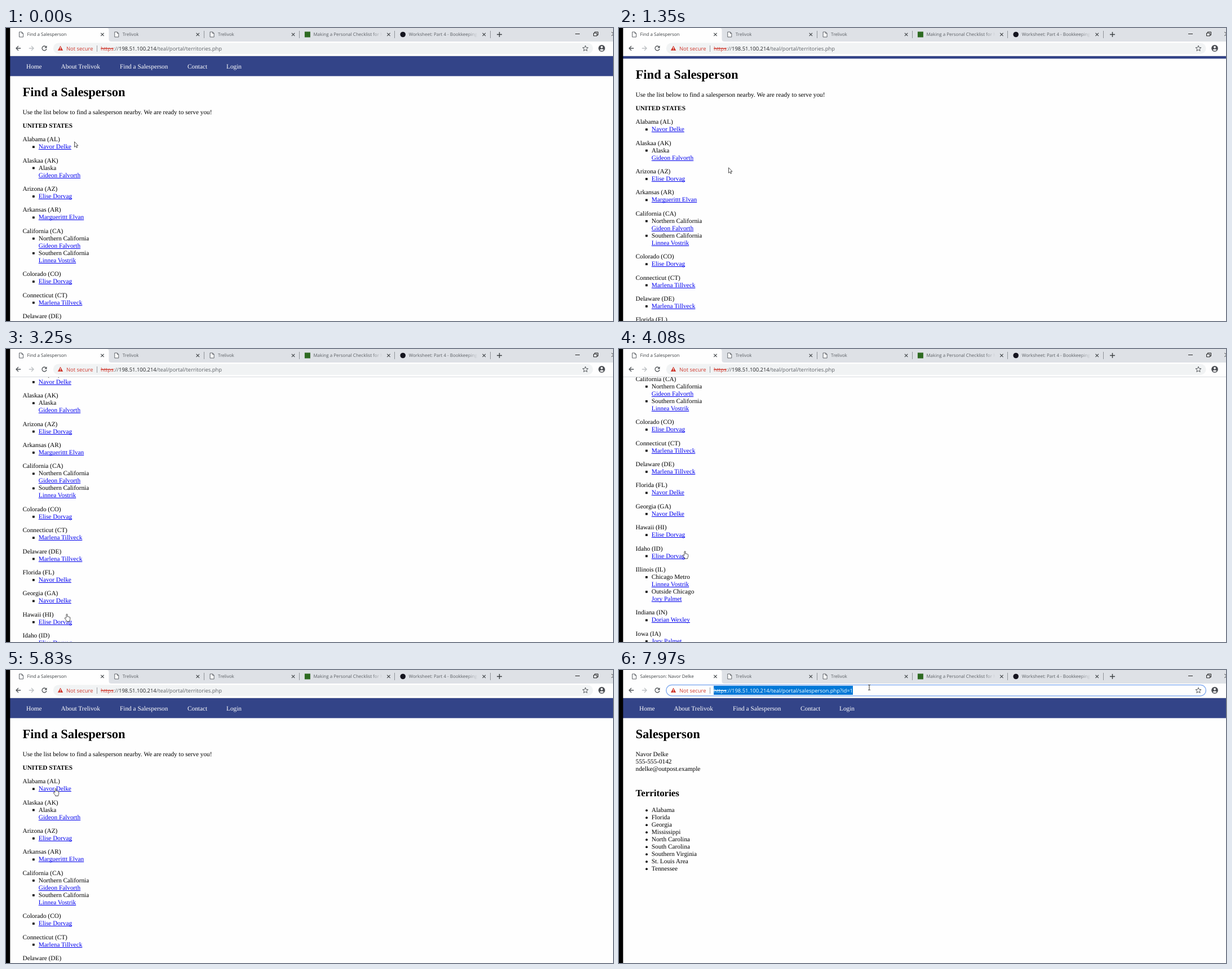
An HTML page with a canvas that plays this animation: 1077x520 px, repeating every 8 s.

```html
<!DOCTYPE html>
<html lang="en">
<head>
<meta charset="utf-8">
<title>Find a Salesperson</title>
<style>
  html, body { margin: 0; width: 100%; height: 100%; overflow: hidden; background: #fefefe; }
  canvas { display: block; }
</style>
</head>
<body>
<canvas id="stage" width="1077" height="520"></canvas>
<script>
const ctx = document.getElementById('stage').getContext('2d');
const LOOP = 8000, PAGE = '#fefefe', LINK = '#0000ee';
const SERIF = '"Liberation Serif", serif', SANS = '"Open Sans", sans-serif';
const BODY = `11.3px ${SERIF}`, BOLD = `bold 11.3px ${SERIF}`;
const TAB_FONT = `8px ${SANS}`, BAR_FONT = `9.42px ${SANS}`;
const LEFT = 29.5, INDENT = 57.8, LINE = 13, GAP = 11.4;

const [NAVOR, GIDEON, ELISE, MARGUERITTT, LINNEA, MARLENA, JORY, DORIAN] = [
  'Navor Delke', 'Gideon Falvorth', 'Elise Dorvag', 'Marguerittt Elvan',
  'Linnea Vostrik', 'Marlena Tillveck', 'Jory Palmet', 'Dorian Wexley'];

// Each state holds its sellers, or [area, seller] pairs.
const STATES = [
  ['Alabama (AL)', NAVOR],
  ['Alaskaa (AK)', ['Alaska', GIDEON]],
  ['Arizona (AZ)', ELISE],
  ['Arkansas (AR)', MARGUERITTT],
  ['California (CA)', ['Northern California', GIDEON], ['Southern California', LINNEA]],
  ['Colorado (CO)', ELISE],
  ['Connecticut (CT)', MARLENA],
  ['Delaware (DE)', MARLENA],
  ['Florida (FL)', NAVOR],
  ['Georgia (GA)', NAVOR],
  ['Hawaii (HI)', ELISE],
  ['Idaho (ID)', ELISE],
  ['Illinois (IL)', ['Chicago Metro', LINNEA], ['Outside Chicago', JORY]],
  ['Indiana (IN)', DORIAN],
  ['Iowa (IA)', JORY],
  ['Kansas (KS)', JORY],
];
const TERRITORIES = ['Alabama', 'Florida', 'Georgia', 'Mississippi', 'North Carolina',
  'South Carolina', 'Southern Virginia', 'St. Louis Area', 'Tennessee'];

// [time, scroll offset], held until the next entry
const SCROLL = [[0, 0], [1350, 31], [1490, 60], [1620, 80], [1760, 91], [3250, 152.4], [3400, 200],
  [3680, 225], [3820, 260], [3950, 295], [4080, 307], [4210, 150], [4470, 0]];

// Pointer moves: start, end, steps, way points
const MOVES = [
  [150, 1100, 8, [[121, 201], [99, 262], [140, 309], [194, 247]]],
  [1490, 2310, 7, [[194, 247], [162, 331]]],
  [2430, 2970, 5, [[162, 331], [112, 400], [104, 440], [108, 470]]],
  [3680, 4080, 4, [[108, 470], [117, 358.5]]],
  [5150, 5830, 6, [[117, 358.5], [133, 146], [88, 210]]],
  [6360, 6790, 4, [[88, 210], [351, 155]]],
  [7090, 7510, 4, [[351, 155], [470, 90], [514, 40], [470, 5], [444, 31]]],
];
const HAND_TIMES = [[2970, 4210], [5830, 6360]];
const PAGE_CHANGE = 6360, FOCUS = 7810, SELECT = 7970;

function pointer(t) {
  let spot = MOVES[0][3][0];
  for (const [start, end, steps, points] of MOVES) {
    if (t < start) break;
    const step = Math.min(steps, 1 + Math.floor((t - start) / (end - start) * (steps - 1) + 1e-6));
    const pos = step / steps * (points.length - 1);
    const i = Math.min(Math.floor(pos), points.length - 2);
    spot = points[i].map((v, axis) => v + (points[i + 1][axis] - v) * (pos - i));
  }
  return spot;
}

function text(str, x, y, font = BODY, color = '#000') {
  ctx.font = font;
  ctx.fillStyle = color;
  ctx.fillText(str, x, y);
  return ctx.measureText(str).width;
}
function rect(x, y, w, h, color) {
  ctx.fillStyle = color;
  ctx.fillRect(x, y, w, h);
}
function disc(x, y, r, color) {
  ctx.fillStyle = color;
  ctx.beginPath();
  ctx.arc(x, y, r, 0, 7);
  ctx.fill();
}
function shape(d, x, y, { fill, stroke, width = 1 }) {
  const path = new Path2D(d);
  ctx.save();
  ctx.translate(x, y);
  if (fill) { ctx.fillStyle = fill; ctx.fill(path); }
  if (stroke) { ctx.strokeStyle = stroke; ctx.lineWidth = width; ctx.stroke(path); }
  ctx.restore();
}
function link(str, x, y) {
  const width = text(str, x, y, BODY, LINK);
  rect(x, Math.round(y + 1), width, 1, LINK);
}

function drawNav(y) {
  rect(7, y, 1070, 35.4, '#334488');
  [['Home', 36], ['About Trelivok', 97.5], ['Find a Salesperson', 202], ['Contact', 322], ['Login', 391]]
    .forEach(([label, x]) => text(label, x, y + 22.3, BODY, '#fff'));
}

function drawList(scroll) {
  drawNav(50 - scroll);
  text('Find a Salesperson', LEFT, 121.3 - scroll, `bold 22.6px ${SERIF}`);
  text('Use the list below to find a salesperson nearby. We are ready to serve you!', LEFT, 152.6 - scroll);
  text('UNITED STATES', LEFT, 177 - scroll, BOLD);
  let y = 201.2 - scroll;
  for (const [state, ...entries] of STATES) {
    text(state, LEFT, y);
    for (const entry of entries) {
      y += LINE;
      rect(47, y - 4.9, 3.7, 3.7, '#000');
      if (Array.isArray(entry)) {
        text(entry[0], INDENT, y);
        y += LINE;
        link(entry[1], INDENT, y);
      } else link(entry, INDENT, y);
    }
    y += LINE + GAP;
  }
}

function drawPerson() {
  drawNav(50);
  text('Salesperson', LEFT, 121.3, `bold 22.6px ${SERIF}`);
  [NAVOR, '555-555-0142', 'ndelke@outpost.example']
    .forEach((row, i) => text(row, LEFT, 152.6 + i * LINE));
  text('Territories', LEFT, 223.7, `bold 16.95px ${SERIF}`);
  TERRITORIES.forEach((name, i) => {
    disc(49, 249.2 + i * LINE, 1.9, '#000');
    text(name, INDENT, 252.3 + i * LINE);
  });
}

function drawTabs(title) {
  const gray = '#5f6368', dark = '#3c4043';
  rect(7, 0, 1070, 24, '#dee1e6');
  shape('M7 0H179Q182.500 0 182.500 4V20Q182.500 24 187 24H7Z', 0, 0, { fill: PAGE });
  const names = [title, 'Trelivok', 'Trelivok',
    'Making a Personal Checklist for My Desk', 'Worksheet: Part 4 - Bookkeeping Basics'];
  names.forEach((name, i) => {
    const x = 27 + i * 169.3;
    if (i < 3) shape('M-3.500 -4.500H1L3.500 -2V4.500H-3.500ZM1 -4.500V-2H3.500', x, 11.5, { fill: PAGE, stroke: gray });
    if (i === 3) rect(x - 5, 6.5, 10, 10, '#2e6b22');
    if (i === 4) disc(x, 11.5, 4.8, '#15151f');
    const color = ctx.createLinearGradient(x + 114, 0, x + 133, 0);
    color.addColorStop(0, i ? '#5a5e63' : dark);
    color.addColorStop(1, 'rgba(90,94,99,0)');
    text(name, x + 10.5, 14, TAB_FONT, color);
    shape('M-2.700 -2.700L2.700 2.700M2.700 -2.700L-2.700 2.700', x + 144, 11.5, { stroke: dark, width: 1.1 });
    if (i) rect(Math.round(x + 154.5), 5, 1, 13, '#8f9398');
  });
  shape('M-4.500 0H4.500M0 -4.500V4.500', 875.5, 11.5, { stroke: dark, width: 1.4 });
  shape('M-4 0H4', 1014, 10.5, { stroke: '#222' });
  shape('M-3.500 -1.500H2.500V3.500H-3.500ZM-1.500 -1.500V-3.500H4.500V2H2.500', 1046, 10.5, { stroke: '#222' });
  shape('M-3.500 -3.500L3.500 3.500M3.500 -3.500L-3.500 3.500', 1078, 10.5, { stroke: '#222' });
}

function drawToolbar(file, focused, selected) {
  const gray = '#5f6368', red = '#d03a2f';
  rect(7, 24, 1070, 26, PAGE);
  rect(7, 49, 1070, 1, '#d9dbde');
  const arrow = 'M4.200 0H-4M0 -4L-4 0L0 4';
  shape(arrow, 22, 36, { stroke: '#4f5357', width: 1.3 });
  ctx.save();
  ctx.translate(45, 36);
  ctx.scale(-1, 1);
  shape(arrow, 0, 0, { stroke: '#bcbfc2', width: 1.3 });
  ctx.restore();
  shape('M3 -2.700A4 4 0 1 0 3.900 1', 68, 36, { stroke: '#4f5357', width: 1.3 });
  shape('M4.500 -4.800V-0.500H0.200Z', 68, 36, { fill: '#4f5357' });

  ctx.beginPath();
  ctx.roundRect(83.8, 26.5, 957.6, 19.4, 9.7);
  ctx.fillStyle = focused ? PAGE : '#f1f3f4';
  ctx.fill();
  if (focused) {
    ctx.strokeStyle = '#86aef0';
    ctx.lineWidth = 1.5;
    ctx.stroke();
  }
  shape('M0 -4.500L4.700 4H-4.700Z', 96.5, 36, { fill: red });
  rect(96, 34, 1, 3, '#fff');
  rect(96, 38, 1, 1, '#fff');
  text('Not secure', 107, 39.5, BAR_FONT, red);
  rect(161, 31, 1, 11, '#9a9da1');

  const parts = [['https', red], ['://', gray], ['198.51.100.214', '#202124'], [`/teal/portal/${file}`, gray]];
  ctx.font = BAR_FONT;
  if (selected) {
    rect(168, 28, ctx.measureText(parts.map(p => p[0]).join('')).width, 16, '#0078d7');
  }
  let x = 168;
  parts.forEach(([str, color], i) => {
    const ink = selected ? '#fff' : color;
    const width = text(str, x, 39.5, BAR_FONT, ink);
    if (!i) rect(x, 36, width, 1, ink);
    x += width;
  });

  shape('M0 -5L1.400 -1.600L5 -1.400L2.200 0.900L3.100 4.400L0 2.500L-3.100 4.400L-2.200 0.900L-5 -1.400L-1.400 -1.600Z',
    1028, 36.2, { stroke: '#55595d' });
  disc(1057, 36, 5.9, '#4a4d52');
  disc(1057, 34, 1.9, PAGE);
  shape('M-3.600 3Q0 0.200 3.600 3Q0 6 -3.600 3Z', 1057, 36, { fill: PAGE });
}

function drawPointer(t) {
  const [x, y] = pointer(t);
  const ink = { fill: '#fff', stroke: '#222', width: 0.8 };
  if (HAND_TIMES.some(([a, b]) => t >= a && t < b)) {
    shape('M-1 7V1.500Q-1 0.400 0 0.400T1 1.500V5Q2 4.300 2.700 5.300Q3.700 4.700 4.300 5.700Q5.700 5.300 5.700 7V9.500Q5.700 11 4.700 12V13.500H-0.500V12.300L-3.700 8.300Q-4 6.700 -2.600 6.800L-1 8.300', x, y, ink);
  } else if (y > 25 && y < 47) {
    shape('M-2 -4.500H-0.500L0 -4L0.500 -4.500H2M0 -4V4M-2 4.500H-0.500L0 4L0.500 4.500H2', x, y, { stroke: '#333' });
  } else {
    shape('M0.500 0.800V10.300L2.600 8.300L4.100 11.600L5.600 10.900L4.200 7.700H7Z', x, y, ink);
  }
}

function draw(t) {
  const onPerson = t >= PAGE_CHANGE;
  rect(0, 0, 1077, 520, PAGE);
  if (onPerson) drawPerson();
  else drawList(SCROLL.findLast(([time]) => t >= time)[1]);
  drawTabs(onPerson ? `Salesperson: ${NAVOR}` : 'Find a Salesperson');
  drawToolbar(onPerson ? 'salesperson.php?id=1' : 'territories.php', t >= FOCUS, t >= SELECT);
  rect(0, 0, 7.3, 520, '#000');
  drawPointer(t);
}

function frame() {
  draw(performance.now() % LOOP);
  requestAnimationFrame(frame);
}
ctx.textRendering = 'geometricPrecision';
frame();
</script>
</body>
</html>
```
